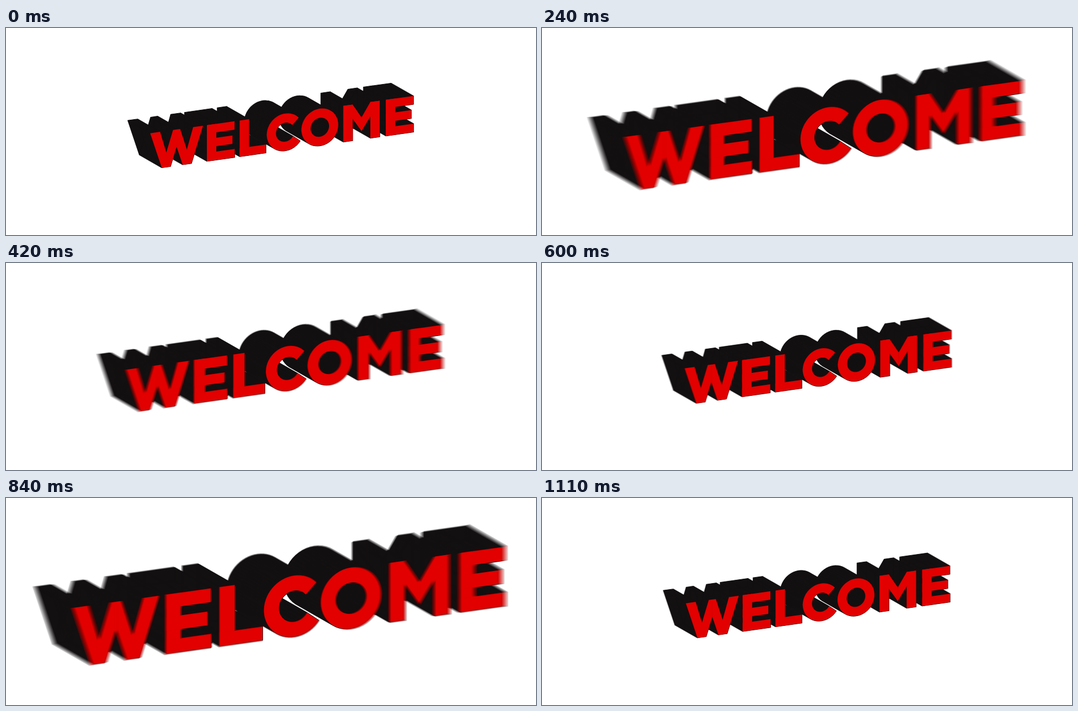
Animation, 963 px wide and 377 px high, one loop 1140 ms. Source, as an HTML page with a canvas:

```html
<!DOCTYPE html>
<html lang="en">
<head>
<meta charset="utf-8">
<title>Welcome</title>
<style>
  html, body { margin: 0; width: 100%; height: 100%; overflow: hidden; background: #fff; }
  canvas { display: block; }
</style>
</head>
<body>
<canvas id="stage" width="963" height="377" role="img" aria-label="WELCOME"></canvas>
<script>
const W = 963, H = 377, CX = 482, CY = 178.4;
const TOP = 160.4, CAP = 65.8, STEM = 17.2, BAR = 15.3;
const SHEAR = 0.142, DEPTH = [-40.7, -23.3];
const FRAME = 30, FRAMES = 38, BEAT = 18.8, SAMPLES = 16, SHUTTER = 0.5;
const RED = '#e20000', BLACK = '#131011';

const stage = document.getElementById('stage').getContext('2d');
const layer = document.createElement('canvas');
layer.width = W;
layer.height = H;
const pen = layer.getContext('2d');

// Letter parts: x is a stage position, y runs from cap line (0) to baseline (CAP).
const rect = (x, y, w, h) => [[x, y], [x + w, y], [x + w, y + h], [x, y + h]];
const stem = x => rect(x, 0, STEM, CAP);
const bar = (x, y, w) => rect(x, y, w, BAR);

const arc = (cx, r, from, to) => Array.from({ length: 49 }, (_, i) => {
  const a = (from + (to - from) * i / 48) * Math.PI / 180;
  return [cx + r * Math.cos(a), CAP / 2 + (r + 0.5) * Math.sin(a)];
});
const ring = (cx, from, to, cut = 0) =>
  [...arc(cx, 33.5, from, to), ...arc(cx, 16.8, to + cut, from - cut)];

// Half a letter, repeated as its mirror image about x + mid.
const twin = (x, mid, parts) => parts.flatMap(part =>
  [1, -1].map(side => part.map(([px, py]) => [x + mid + side * (px - mid), py])));

const letterE = x => [stem(x), bar(x, 0, 50.3), bar(x, (CAP - BAR) / 2, 46.5), bar(x, CAP - BAR, 50.6)];
const letterL = x => [stem(x), bar(x, CAP - BAR, 47.8)];
const letterM = x => twin(x, 33.2, [
  rect(0, 0, STEM, CAP),
  [[0, 0], [STEM, 0], [33.4, 26], [33.4, 51]]
]);
const letterW = x => twin(x, 48, [
  [[0, 0], [18, 0], [37, CAP], [21, CAP]],
  [[41.5, 0], [48.2, 0], [48.2, 31], [37, CAP], [21, CAP]]
]);

const parts = [
  ...letterW(262), ...letterE(365), ...letterL(424.5),
  ring(507.3, 35.5, 317.5, 3), ring(570.2, 0, 360),
  ...letterM(612.7), ...letterE(690)
].map(part => part.map(([x, y]) => [x - CX, y + TOP - CY - SHEAR * (x - CX)]));

const addPolygon = (path, pts) => {
  pts.forEach(([x, y], i) => i ? path.lineTo(x, y) : path.moveTo(x, y));
  path.closePath();
  return path;
};

const rear = ([x, y]) => [x + DEPTH[0], y + DEPTH[1]];
const faces = parts.map(part => addPolygon(new Path2D(), part));
const sides = new Path2D();
for (const part of parts) {
  part.forEach((p, i) => {
    const q = part[(i + 1) % part.length];
    const turn = (q[0] - p[0]) * DEPTH[1] - (q[1] - p[1]) * DEPTH[0];
    const quad = [p, q, rear(q), rear(p)];
    // One winding for all quads, so that overlaps never cancel.
    addPolygon(sides, turn < 0 ? quad.reverse() : quad);
  });
}

const zoom = f => 1 + 0.664 * (1 - Math.abs(Math.cos(Math.PI * f / BEAT)));

function drawWord(scale) {
  pen.setTransform(1, 0, 0, 1, 0, 0);
  pen.fillStyle = '#fff';
  pen.fillRect(0, 0, W, H);
  pen.setTransform(scale, 0, 0, scale, CX, CY);
  pen.fillStyle = pen.strokeStyle = BLACK;
  pen.lineWidth = 1;
  pen.lineJoin = 'round';
  pen.fill(sides);
  pen.stroke(sides);
  pen.fillStyle = RED;
  faces.forEach(face => pen.fill(face));
}

let last = -1;
function render(now) {
  const f = Math.floor(now / FRAME) % FRAMES;
  if (f !== last) {
    last = f;
    // Motion blur: running average over the open shutter.
    for (let i = 0; i < SAMPLES; i++) {
      drawWord(zoom(f + SHUTTER * ((i + 0.5) / SAMPLES - 0.5)));
      stage.globalAlpha = 1 / (i + 1);
      stage.drawImage(layer, 0, 0);
    }
  }
  requestAnimationFrame(render);
}
render(0);
</script>
</body>
</html>
```
